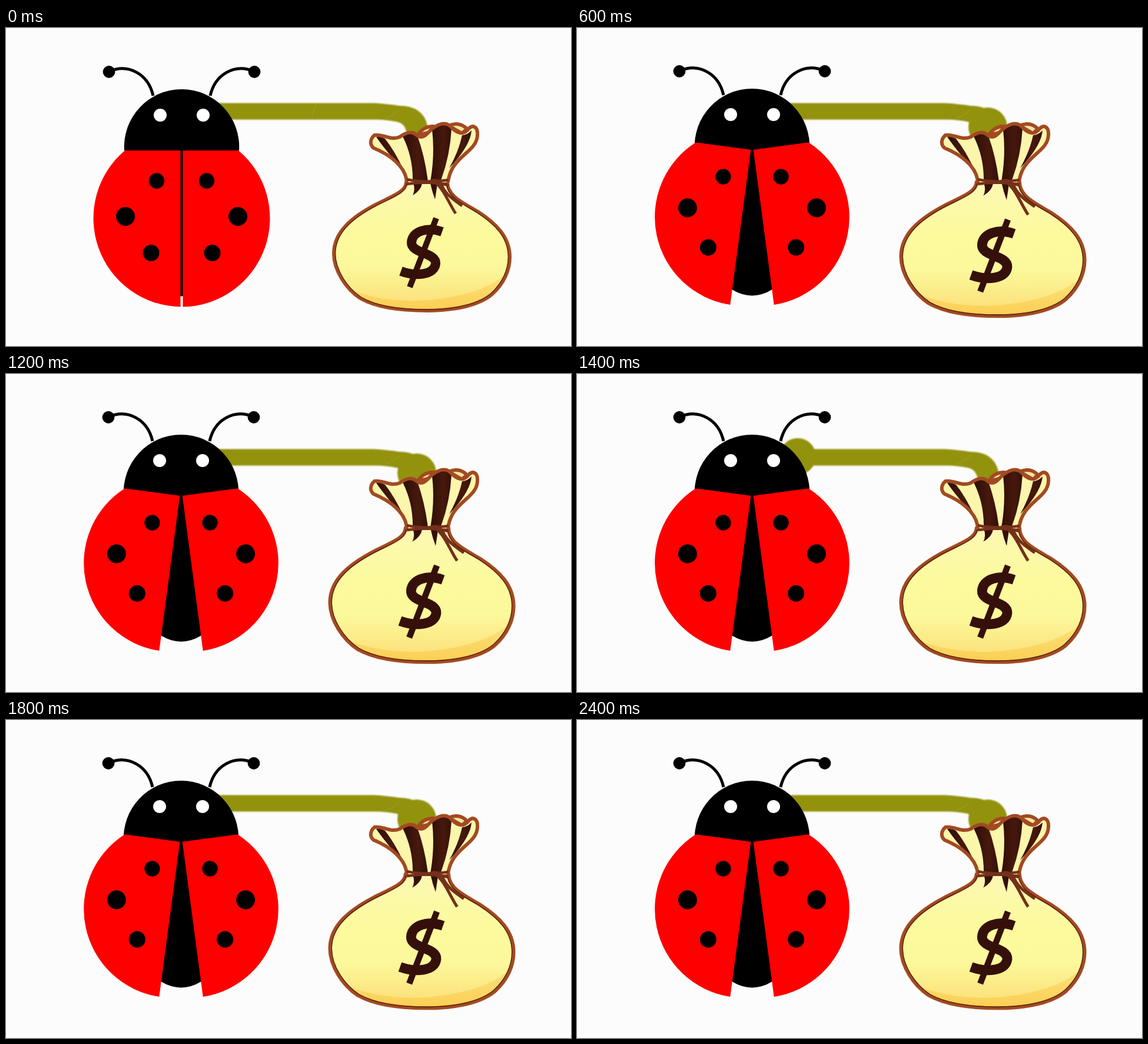
An HTML page that plays this animation: 960x540 px, repeating every 2500 ms.

```html
<!DOCTYPE html>
<html lang="en">
<head>
<meta charset="utf-8">
<title>Ladybug and money bag</title>
<style>
  html, body { margin: 0; width: 100%; height: 100%; overflow: hidden; background: #fcfcfc; }
  svg { display: block; width: 100vw; height: 100vh; }
  .line { fill: none; }
  .rim { stroke: #a24a22; stroke-width: 6; stroke-linejoin: round; }
  .cord { fill: none; stroke: #74301a; stroke-width: 4.8; }
</style>
</head>
<body>
<svg viewBox="0 0 960 540">
  <defs>
    <linearGradient id="cloth" x1="0" y1="0" x2="0" y2="1">
      <stop offset="0" stop-color="#fcf8b4"/>
      <stop offset=".4" stop-color="#fcfa9c"/>
      <stop offset=".65" stop-color="#fcf99c"/>
      <stop offset="1" stop-color="#fbdc74"/>
    </linearGradient>
    <linearGradient id="shade" x1="0" y1="0" x2="0" y2="1">
      <stop offset="0" stop-color="#fbe27c"/>
      <stop offset="1" stop-color="#fbcb4c"/>
    </linearGradient>
    <linearGradient id="stripe" x1="0" y1="0" x2="1" y2="0">
      <stop offset="0" stop-color="#2e0d06"/>
      <stop offset=".6" stop-color="#47190d"/>
      <stop offset="1" stop-color="#34100a"/>
    </linearGradient>
    <filter id="soft" x="-10%" y="-20%" width="120%" height="140%">
      <feGaussianBlur stdDeviation=".9"/>
    </filter>
    <path id="sack" d="M680 262C680 278 655 286 628 300C590 320 557 345 557 383C557 412 578 443 602 459C630 475 672 480 715 480C765 480 805 470 826 452C846 434 856 411 856 389C856 355 833 332 802 312C775 296 750 285 750 262Z"/>
    <clipPath id="inSack"><use href="#sack"/></clipPath>
    <path id="frill" d="M681 264C681 235 650 214 625 204C617 198 619 188 626 182C640 179 652 192 669 185C679 178 690 173 699 183C710 190 717 177 724 171C735 163 748 157 758 170C768 180 778 182 787 170C794 164 802 168 801 182C800 212 756 217 751 262"/>
    <g id="wing">
      <path fill="#fe0000" d="M296.500 208H202A150.500 150.500 0 0 0 296.500 473.500Z"/>
      <circle cx="256" cy="259.500" r="13.200"/>
      <circle cx="203" cy="320" r="16"/>
      <circle cx="246.500" cy="382" r="14"/>
    </g>
    <g id="feeler">
      <path class="line" stroke="#000" stroke-width="5" d="M176 73.500C208 59.500 242 78.500 250 115"/>
      <circle cx="175" cy="74.500" r="10.400"/>
    </g>
  </defs>

  <g fill="#93920d" filter="url(#soft)">
    <path d="M340 127.500H625Q650 129 668 132Q708 132 716 165V182H681Q680 162 663 159Q645 155.500 630 155.500H340Z"/>
    <circle id="lump"/>
  </g>
  <path class="line" stroke="#a3a238" stroke-width=".8" d="M645 153Q660 148 669 138"/>
  <path id="crease" class="line" stroke="#a3a238" stroke-width=".8" d="M519 154L527 130"/>

  <g id="bug">
    <use href="#feeler"/>
    <use href="#feeler" transform="translate(597) scale(-1 1)"/>
    <path d="M201 208A97.700 97.700 0 1 1 396 208Z"/>
    <circle cx="262" cy="148" r="11" fill="#fff"/>
    <circle cx="335" cy="148" r="11" fill="#fff"/>
    <ellipse cx="298.500" cy="330.500" rx="85" ry="125"/>
    <use id="left" href="#wing"/>
    <g transform="translate(597) scale(-1 1)"><use id="right" href="#wing"/></g>
  </g>

  <g id="body">
    <use href="#sack" fill="url(#cloth)"/>
    <path clip-path="url(#inSack)" fill="url(#shade)" d="M850 417Q810 453 720 462Q640 468 580 442V490H850Z"/>
    <use href="#sack" class="rim" fill="none"/>
    <use href="#sack" class="line" stroke="#4a1d0c" stroke-width="1.200" transform="translate(706 375) scale(.982) translate(-706 -375)"/>
    <g class="line" stroke="#35100a">
      <path stroke-width="16" d="M741 346C716 337 690 345 689 364C688 383 731 381 730 400C728 420 696 422 671 413"/>
      <path stroke-width="10" d="M731 323L686 440"/>
    </g>
    <path fill="#35100a" d="M692 264H707Q705 276 691 284Q696 274 692 264ZM721 264H733Q731 278 729 291Q724 278 721 264Z"/>
    <path class="cord" d="M729 262C745 275 752 297 764 315M738 262C746 283 760 291 775 302"/>
  </g>

  <g id="neck">
    <path class="rim" fill="#f4e5a0" d="M700 182Q708 167 726 167L742 172ZM752 166Q770 158 783 171L775 179Z"/>
    <use href="#frill" fill="#fcf6ac"/>
    <g fill="url(#stripe)">
      <path d="M629 185Q637 184 644 188Q660 208 675 240Q650 215 629 185Z"/>
      <path d="M674 184Q690 173 700 186Q712 220 717 261H691Q692 220 674 184Z"/>
      <path d="M724 173Q744 156 757 171Q754 220 738 261H721Q729 215 724 173Z"/>
      <path d="M775 182Q783 182 791 174Q789 200 753 238Q769 210 775 182Z"/>
    </g>
    <use href="#frill" class="rim" fill="none"/>
    <path class="cord" d="M681 257Q714 264 752 258M681 265Q716 259 752 267M717 262Q728 255 739 263"/>
  </g>
</svg>
<script>
  const $ = id => document.getElementById(id);
  const LOOP = 2500, STEP = 100;
  // Flap poses: wing angle, bag scale, bug nudge
  const poses = [[0, 1, 0], [7.6, 1.043, -1], [13.3, 1.09, -1]];
  const flap = [0, 1, 2, 1];
  // Lump stations along the hose: x, y, radius (first is hidden by the bug)
  const lumps = [[290, 141, 0], [375, 140, 31], [460, 142, 31], [546, 144, 31.5], [627, 144, 32], [698, 168, 33]];

  function draw(now) {
    const step = Math.max(0, Math.floor(now % LOOP / STEP) - 1);
    const [angle, scale, nudge] = poses[flap[step % flap.length]];
    const stop = step % lumps.length;
    const [x, y, r] = lumps[stop];

    for (const id of ["left", "right"]) $(id).setAttribute("transform", `rotate(${angle} 298.5 207)`);
    $("bug").setAttribute("transform", `translate(${nudge} ${nudge})`);
    $("body").setAttribute("transform", `translate(706 265) scale(${scale}) translate(-706 -265)`);
    $("lump").setAttribute("cx", x);
    $("lump").setAttribute("cy", y);
    $("lump").setAttribute("r", r);
    $("crease").style.display = stop ? "none" : "";
  }

  const start = performance.now();
  function tick() {
    draw(performance.now() - start);
    requestAnimationFrame(tick);
  }
  tick();
</script>
</body>
</html>
```
